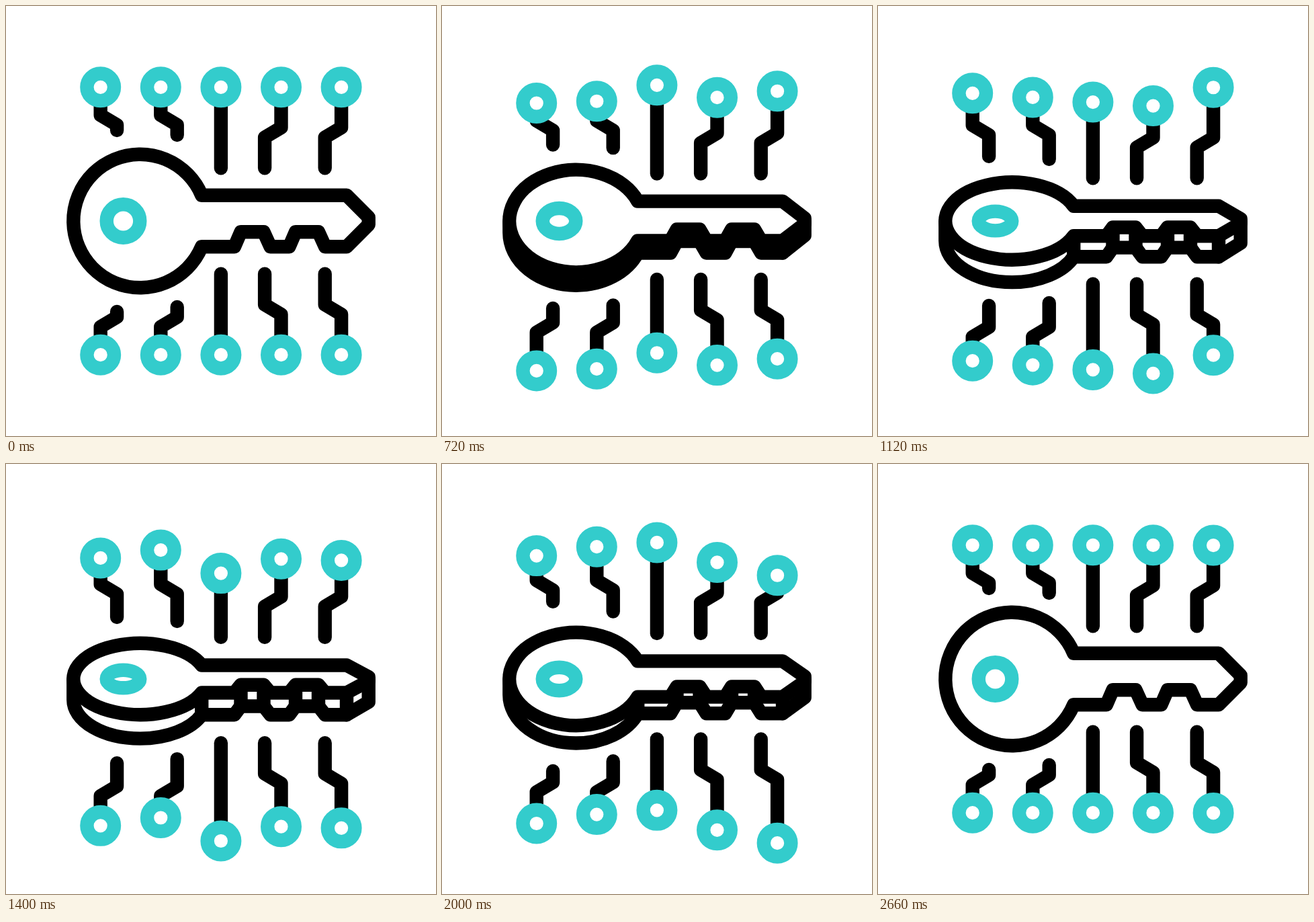
Write an HTML page with a canvas that moves like this. It is 640 px wide and 640 px high and loops after 3 s.

```html
<!DOCTYPE html>
<html lang="en">
<head>
<meta charset="utf-8">
<title>Digital key</title>
<style>
  html, body { margin: 0; width: 100%; height: 100%; overflow: hidden; background: #fff; }
  canvas { display: block; }
</style>
</head>
<body>
<canvas id="stage" width="640" height="640"></canvas>
<script>
const ctx = document.getElementById('stage').getContext('2d');
const SIZE = 640, MID = SIZE / 2, LOOP = 3000, START = 200, END = 2660;
const TEAL = '#33cccc', BLACK = '#000';

// Key geometry, y measured from the middle line.
const NECK = 38.3, NOTCH = 16.3, SHOULDER = 507, TIP = 539.7, TIP_Y = 5.5;
const HEAD = { x: 199.6, r: 99.3 };
const GAP = Math.asin(NECK / HEAD.r);
const NOTCHES = [340, 421.5].map(x =>
  [[x, NECK], [x + 9.5, NOTCH], [x + 43.5, NOTCH], [x + 53.5, NECK]]);
const BLADE = [...NOTCHES.flat(), [SHOULDER, NECK], [TIP, TIP_Y]];
const EDGES = [
  [HEAD.x + HEAD.r * Math.cos(GAP), NECK], [SHOULDER, NECK],
  ...NOTCHES.flatMap(notch => notch.slice(1, 3))
];

// swing: [time, height] turning points of the node; stretch: [peak, hold end, rest].
const WIRES = [
  { side: 24.4, bendY: 162.5, end: 185, stretch: [1400, 1600, 2260],
    swing: [[760, 24], [1120, 9], [1640, 27], [2450, 0]] },
  { side: 24.4, bendY: 162.5, end: 192, stretch: [1600, 1730, 2380],
    swing: [[740, 21], [1720, 3], [END, 0]] },
  { side: 0, end: 241.3, swing: [[760, -3], [1430, 42], [1960, -4], [2400, 2], [END, 0]] },
  { side: -24.4, bendY: 181, end: 241.3, swing: [[1180, 28], [1640, 12], [1960, 26], [2500, 0]] },
  { side: -24.4, bendY: 181, end: 241.3, swing: [[700, 6], [1080, 0], [1780, 52], [2700, 0]] }
];

const clamp = u => Math.min(1, Math.max(0, u));
const quarterSine = u => Math.sin(clamp(u) * Math.PI / 2);

// 0 to 1, hold, and back to 0.
function bump(t, peak, holdEnd, rest = END) {
  const rise = quarterSine((t - START) / (peak - START)) ** 1.5;
  const fall = quarterSine((rest - t) / (rest - holdEnd)) ** 2;
  return rise * fall;
}

// Ease from each turning point to the next.
function swing(points, t) {
  let [t0, y0] = [START, 0];
  for (const [t1, y1] of points) {
    if (t < t1) return y0 + (y1 - y0) * quarterSine((t - t0) / (t1 - t0)) ** 2;
    [t0, y0] = [t1, y1];
  }
  return y0;
}

function stroke(path, color, filled) {
  if (filled) {
    ctx.fillStyle = '#fff';
    ctx.fill(path);
  }
  ctx.strokeStyle = color;
  ctx.stroke(path);
}

function polyline(points) {
  const path = new Path2D();
  points.forEach(([x, y]) => path.lineTo(x, y));
  return path;
}

function ring(x, y, rx, ry) {
  const path = new Path2D();
  path.ellipse(x, y, rx, ry, 0, 0, 2 * Math.PI);
  stroke(path, TEAL, true);
}

function drawWire(wire, x, t, shift, flip) {
  const place = (y, offset) => (flip ? SIZE - y : y) + offset;
  const nodeY = place(120.8, swing(wire.swing, t));
  const stretch = wire.stretch ? 26.5 * bump(t, ...wire.stretch) : 0;
  const endX = x + wire.side;
  const points = [[x, nodeY]];
  if (wire.side) {
    points.push([x, place(wire.bendY, shift)], [endX, place(wire.bendY + 14.5, shift)]);
  }
  points.push([endX, place(wire.end + stretch, shift)]);
  stroke(polyline(points), BLACK);
  ring(x, nodeY, 20.3, 20.3);
}

function faceOutline(scale) {
  const path = new Path2D();
  path.ellipse(HEAD.x, MID, HEAD.r, HEAD.r * scale, 0, -GAP, GAP, true);
  BLADE.forEach(([x, y]) => path.lineTo(x, MID + y * scale));
  path.lineTo(TIP, MID - TIP_Y * scale);
  path.lineTo(SHOULDER, MID - NECK * scale);
  path.closePath();
  return path;
}

// The thick side below the face; its top is hidden behind the face.
function sideOutline(y, scale) {
  const path = new Path2D();
  path.moveTo(HEAD.x - HEAD.r, MID);
  path.ellipse(HEAD.x, y, HEAD.r, HEAD.r * scale, 0, Math.PI, GAP, true);
  BLADE.forEach(([px, py]) => path.lineTo(px, y + py * scale));
  path.lineTo(TIP, MID);
  path.closePath();
  return path;
}

function drawKey(t, tilt) {
  const face = 1 - .465 * tilt, base = 1 - .42 * tilt;
  const baseY = MID + 31 * bump(t, 1300, 1680);
  if (baseY > MID) {
    stroke(sideOutline(baseY, base), BLACK, true);
    EDGES.forEach(([x, y]) =>
      stroke(polyline([[x, MID + y * face], [x, baseY + y * base]]), BLACK));
  }
  stroke(faceOutline(face), BLACK, true);
  ring(174.5, MID, 24.8, 24.8 * face);
}

function frame(now) {
  const t = now % LOOP;
  const tilt = bump(t, 1400, 1560);
  ctx.clearRect(0, 0, SIZE, SIZE);
  ctx.lineWidth = 20.4;
  ctx.lineCap = ctx.lineJoin = 'round';
  WIRES.forEach((wire, i) => {
    for (const flip of [false, true]) drawWire(wire, 140.7 + 89.6 * i, t, 16.6 * tilt, flip);
  });
  drawKey(t, tilt);
  requestAnimationFrame(frame);
}
requestAnimationFrame(frame);
</script>
</body>
</html>
```
